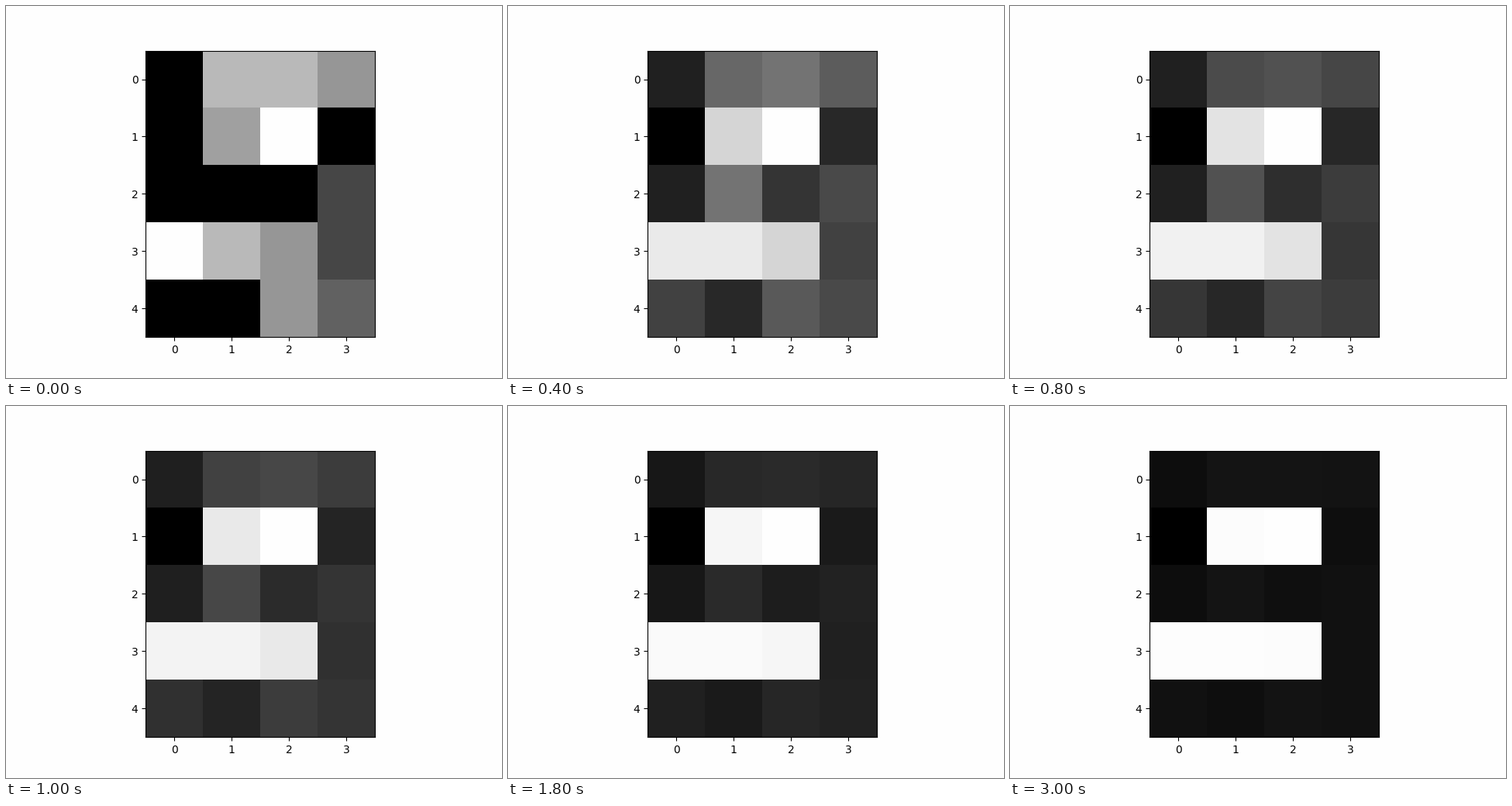
Recreate the animation shown at these times as a matplotlib script. Size 640 by 480 pixels, loop 4 s.

```python
import numpy as np
import matplotlib.pyplot as plt
from matplotlib.animation import FuncAnimation

STEP = 200
FRAMES = 20
WHITE = 254
GROUND = 85  # typical level of the dark cells after one step

# The two opening grids are random-looking key poses; the rest follows a rule.
noisy = np.array([
    [0, 185, 185, 150],
    [0, 160, WHITE, 0],
    [0, 0, 0, 70],
    [WHITE, 185, 150, 70],
    [0, 0, 150, 98],
])
rough = np.array([
    [25, 130, 152, 112],
    [0, 202, WHITE, 36],
    [25, 152, 50, 82],
    [228, 228, 202, 68],
    [68, 36, 108, 82],
])

# Cells that end as white bars
bars = np.zeros((5, 4), dtype=bool)
bars[1, 1:3] = True
bars[3, :3] = True

# Steps at which the picture moves on; it holds in between
moves = [0, 1, 2, 3, 4, 5, 7, 9, 10, 11, 15]


def levels(n):
    """Grey levels at step n: bars brighten, the ground evens out and fades."""
    if n == 0:
        return noisy
    light = WHITE - (WHITE - rough) * 0.8 ** (n - 1)
    dark = GROUND * 0.895 ** (n - 1) * (rough / GROUND) ** (n ** -0.5)
    return np.where(bars, light, dark)


fig, ax = plt.subplots(figsize=(6.4, 4.8), dpi=100, facecolor="#fefefe")
image = ax.imshow(noisy, cmap="gray", vmin=0, vmax=255)


def update(frame):
    image.set_data(levels(max(n for n in moves if n <= frame)))
    return [image]


anim = FuncAnimation(fig, update, frames=FRAMES, interval=STEP,
                     repeat=True, repeat_delay=0, blit=False)
plt.show()
```
